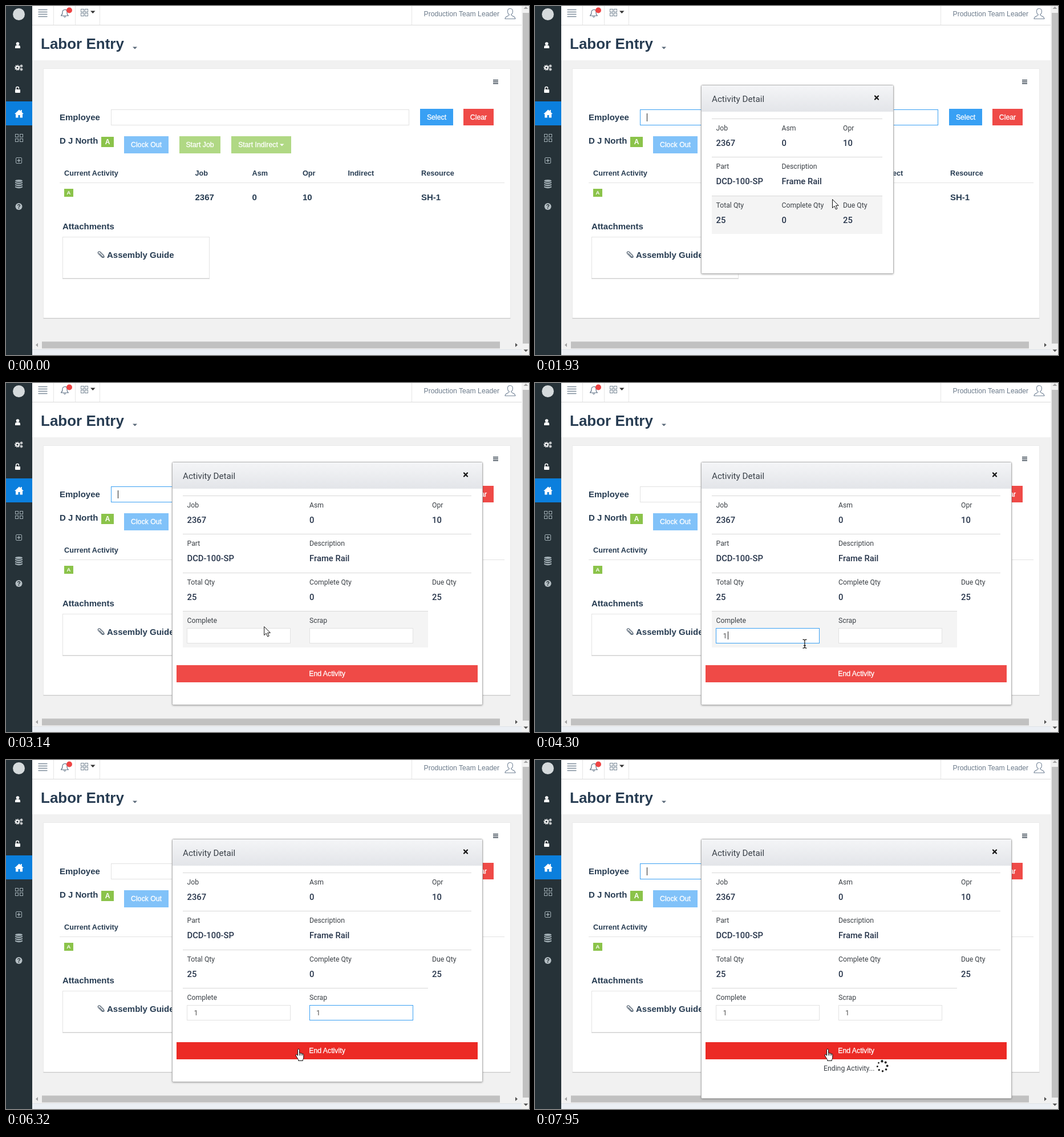
Write an HTML page that moves like this. It is 917x611 px and loops after 8000 ms.

```html
<!DOCTYPE html>
<html lang="en">
<head>
<meta charset="utf-8">
<title>Labor Entry</title>
<style>
  html, body { margin: 0; width: 100%; height: 100%; overflow: hidden; background: #fff; }
  svg { display: block; width: 917px; height: 611px; }
  text { font-family: "Liberation Sans", Arial, sans-serif; white-space: pre; }
  .b { font-weight: 700; fill: #273c52; }
  .btn { fill: #fff; stroke: #fff; stroke-width: .3px; font-size: 12.3px; text-anchor: middle; }
  .lab { font: 400 12.25px Roboto, sans-serif; fill: #3b4046; }
  .val { font: 500 14.8px Roboto, sans-serif; fill: #26344a; }
  .head { font: 400 15.2px Roboto, sans-serif; fill: #3a4149; }
  .num { font: 400 12.6px Roboto, sans-serif; fill: #555; }
  .line { fill: none; stroke-linecap: round; stroke-linejoin: round; }
</style>
</head>
<body>
<svg id="stage" viewBox="0 0 917 611" xmlns="http://www.w3.org/2000/svg"></svg>
<script>
const LOOP = 8000;
const BLUE = '#3aa0f3', RED = '#ef4a47', NAVY = '#273c52';

// Drawing helpers
const box = (x, y, w, h, fill, more = '') =>
  `<rect x="${x}" y="${y}" width="${w}" height="${h}" fill="${fill}" ${more}/>`;
const frame = (x, y, w, h, stroke, more = '') =>
  `<rect x="${x + .5}" y="${y + .5}" width="${w - 1}" height="${h - 1}" fill="none" stroke="${stroke}" ${more}/>`;
const path = (d, fill, more = '') => `<path d="${d}" fill="${fill}" ${more}/>`;
const dot = (x, y, r, fill, more = '') => `<circle cx="${x}" cy="${y}" r="${r}" fill="${fill}" ${more}/>`;
const ink = (d, color, w = 1) => `<path class="line" d="${d}" stroke="${color}" stroke-width="${w}"/>`;
const text = (cls, x, y, s, size) =>
  `<text class="${cls}" x="${x}" y="${y}"${size ? ` style="font-size:${size}px"` : ''}>${s}</text>`;
const bold = (x, y, s, size = 15) => text('b', x, y, s, size);
const button = (x, y, w, h, fill, s, tx = x + w / 2) =>
  box(x, y, w, h, fill) + text('btn', tx, y + h / 2 + 4.2, s);
const group = (id, inner) => `<g id="${id}">${inner}</g>`;
const field = (x, y, w, h, cls) =>
  box(x, y, w, h, '#fff') + frame(x, y, w, h, '#e2e2e2') + frame(x, y, w, h, BLUE, `class="${cls}" opacity="0"`);
const caret = (x, y, cls) => box(x, y, 1, 14, '#222', `class="${cls}" visibility="hidden"`);
const badge = (x, y, w, h, size) => box(x, y, w, h, '#8bc34a') +
  `<text x="${x + w / 2}" y="${y + h / 2 + size * .36}" font-size="${size}" font-weight="700" fill="#fff" text-anchor="middle">A</text>`;
const grid4 = (x, y, s, gap, color) => [0, 1, 2, 3].map(i =>
  frame(x + (i % 2) * (s + gap), y + (i >> 1) * (s + gap), s, s, color)).join('');
const cog = (x, y, r, w) => `<circle cx="${x}" cy="${y}" r="${r}" fill="none" stroke="#fff" stroke-width="${w}"/>` +
  `<circle cx="${x}" cy="${y}" r="${r + w * .8}" fill="none" stroke="#fff" stroke-width="${w * .8}" pathLength="16" stroke-dasharray="1 1"/>`;

function sidebar() {
  const dim = '#a3b0b6';
  return box(0, 0, 46, 611, '#263238') + box(0, 167, 46, 42, '#0b7fdd') +
    dot(22.5, 14.5, 10.5, '#d5dadc') +
    dot(20.5, 66, 2.8, '#fff') + path('M16 74v-2q0-3.2 3-3.2h3q3 0 3 3.2v2z', '#fff') +
    cog(20, 108, 2.6, 2) + cog(27, 105, 1.2, 1.2) + cog(27, 111, 1.2, 1.2) +
    box(16, 146, 9, 6, '#fff', 'rx="1"') + ink('M17.6 146v-2.2a2.4 2.4 0 0 1 4.8 0v.6', '#fff', 1.5) +
    path('M15 189l8-7.6 2.8 2.6v-2h2v4l3.2 3h-2v6.500h-4.500v-4.500h-3v4.500h-4.500v-6.500z', '#fff') +
    grid4(16, 224, 6, 2, dim) +
    frame(17, 265, 11, 11, dim, 'rx="1.500"') + ink('M22.500 268v5M20 270.500h5', dim, 1.300) +
    [0, 1, 2].map(i => path(`M16 ${308 + i * 3.8}q6.500 2.500 13 0v2q-6.500 3.500 -13 0z`, dim)).join('') +
    `<ellipse cx="22.5" cy="306" rx="6.500" ry="2" fill="${dim}"/>` +
    dot(22.5, 351, 6, '#b4bec3') +
    '<text x="22.5" y="354.600" font-size="10" font-weight="700" fill="#263238" text-anchor="middle">?</text>';
}

function topBar() {
  const grey = '#7d8c9a', rule = '#e6e6e6';
  return [83, 121, 164].map(x => box(x, 0, 1, 33, rule)).join('') +
    [6, 10, 14, 18].map(y => ink(`M57 ${y + .5}h15`, grey, 1.3)).join('') +
    ink('M96.500 17q2.500-2 2.500-6t4-4.500 4 4.500 2.500 6zM101.500 18.500q1.500 2 3 0', '#64768a', 1.2) +
    dot(111, 7.5, 5, '#ee4444') +
    grid4(131, 5, 6, 1, grey) + path('M148 8.500h8.500l-4.250 4.500z', '#333') +
    bold(61, 75, 'Labor Entry', 26) + path('M222 71.500h8l-4 4z', '#5a6a7a');
}

// The page with (tall) or without the attachments block; d is the extra width.
function page(d, tall) {
  const W = 904 + d, thick = tall ? 585 : 576, end = W - 20;
  const cols = tall ? [331.5, 431.5, 520, 599.5, 728] : [336, 439, 530, 610, 741];
  const heads = ['Job', 'Asm', 'Opr', 'Indirect', 'Resource'], cells = ['2367', '0', '10', '', 'SH-1'];
  const bottom = tall ? 546 : 392;
  let s = box(46, 0, W - 46, 611, '#fff') + box(46, 33, W - 46, 1, '#dcdcdc') +
    box(46, 95, W - 46, tall ? 490 : 476, '#f1f1f1') +
    box(46, thick, W - 46, 17, '#f1f1f1') +
    box(tall ? 63 : 62, thick + 2.5, tall ? 803 : 820, 12, '#c1c1c1') +
    path(`M52 ${thick + 8.5}l4-3.500v7z`, '#a3a3a3') + path(`M${W - 7} ${thick + 8.5}l-4-3.500v7z`, '#505050') +
    box(46, thick + 16, W - 46, 1, '#dfe3e8') + box(46, thick + 17, W - 46, 40, '#ebeff4') +
    topBar() +
    box(711 + d, 0, 1, 33, '#e6e6e6') +
    `<text x="${732.5 + d}" y="18" font-size="12.2" fill="#6c7b8b">Production Team Leader</text>` +
    ink(`M${884 + d} 4.500c-3 0-4.500 2-4.500 4.800 0 3 1.500 5 3 5.700 0 3-7 2-7.500 7.500h18c-.5-5.500-7.500-4.500-7.500-7.500 1.500-.7 3-2.700 3-5.700 0-2.800-1.500-4.800-4.500-4.800z`, '#77879a', 1.1);
  s += box(65.5, 109.5, end - 65, bottom - 108, '#e3e3e3') + box(65.5, bottom, end - 65, 1.4, '#cfcfcf') +
    box(66, 110, end - 66, bottom - 110, '#fff') +
    [129, 132, 135].map(y => box(854 + d, y, 9, 1.5, '#34414e')).join('') +
    bold(94, 200, 'Employee') + field(184, 181, 523 + d, 28, 'emp') + caret(196, 188, 'empCaret') +
    button(726 + d, 180, 58, 29, '#38a0f4', 'Select') + button(802 + d, 180, 53, 29, RED, 'Clear') +
    bold(94, 241, 'D J North') + badge(167, 229, 22, 18, 12) +
    button(207, 228, 78, 30, '#81c2f9', 'Clock Out') + button(304, 228, 72, 30, '#b0d884', 'Start Job') +
    button(395, 228, 105, 30, '#b0d884', 'Start Indirect', 442) + path('M480 241.500h7.500l-3.750 3.800z', '#fff') +
    bold(102, 297, 'Current Activity', 12.7) + box(94, 309, 780 + d, 1, '#e2e2e2') + badge(102, 320, 16, 14, 9.5);
  cols.forEach((x, i) => s += bold(x, 297, heads[i], 12.7) + bold(x, 340, cells[i]));
  if (tall) {
    s += bold(99, 391, 'Attachments') + box(99, 476, 258, 2, '#d4d4d4') + box(99, 404, 258, 73, '#fff') +
      frame(99, 404, 258, 73, '#e4e4e4') + bold(177, 441, 'Assembly Guide') +
      ink('M164 433l5.500 6a1.500 1.500 0 0 0 2-2l-6.500-6.500a2 2 0 0 0-3 3l6.500 6.500a2.700 2.700 0 0 0 4-1', '#4a5a6a', 1.1) +
      box(904, 0, 13, 611, '#f1f1f1') + box(906, 12, 11, 579, '#c1c1c1') +
      path('M907.500 5l4-4 4 4z', '#a3a3a3') + path('M907.500 601.500h8l-4 4z', '#505050');
  }
  return s;
}

const cross = (x, y) => ink(`M${x - 3} ${y - 3}l6 6m0-6l-6 6`, '#111', 2.3);

// Activity dialog: w is its width, xs its three columns.
function dialog(w, xs, wide) {
  const rowW = wide ? 506 : 299, id = wide ? 'wide' : 'narrow';
  const rows = [[['Job', '2367'], ['Asm', '0'], ['Opr', '10']],
    [['Part', 'DCD-100-SP'], ['Description', 'Frame Rail']],
    [['Total Qty', '25'], ['Complete Qty', '0'], ['Due Qty', '25']]];
  let s = `<rect id="${id}Box" x="291.5" y="138.5" width="${w}" height="${wide ? 425 : 330}" rx="2" fill="#fff" stroke="#b4b4b4" filter="url(#shade)"/>` +
    box(292, 139, w - 1, 46, 'url(#bar)') + text('head', 310, 167.5, 'Activity Detail') + cross(292 + w - 30, 160.5) +
    box(310, 332, rowW, 67, '#f4f4f4', `id="${id}Qty"`);
  rows.forEach((row, r) => {
    const y = 197 + r * 67.3;
    s += box(310, Math.round(y), rowW, 1, '#d8d8d8');
    row.forEach(([k, v], i) => s += text('lab', xs[i], y + 21, k) + text('val', xs[i], y + 48, v));
  });
  if (wide) {
    s += box(310, 400, 430, 63, '#f4f4f4', 'id="doneRow"') + box(310, 399, 430, 1, '#d8d8d8') +
      text('lab', 317.5, 420, 'Complete') + text('lab', 532, 420, 'Scrap') +
      field(317, 429, 182, 27, 'done') + field(532, 429, 182, 27, 'scrap') +
      group('doneOne', text('num', 329.5, 447, '1')) + group('scrapOne', text('num', 544, 447, '1')) +
      caret(330, 435, 'doneCaret') + caret(338, 435, 'doneCaret2') +
      caret(544, 435, 'scrapCaret') + caret(552, 435, 'scrapCaret2') +
      box(299, 494, 528, 30, RED) + box(299, 494, 528, 30, '#ec2a25', 'id="hot"') +
      text('btn', 563, 513, 'End Activity') +
      group('ending', text('lab', 506, 544, 'Ending Activity...') + group('spin',
        [...Array(8).keys()].map(i => {
          const a = i * Math.PI / 4;
          return dot((8.7 * Math.cos(a)).toFixed(2), (8.7 * Math.sin(a)).toFixed(2), 2.2 - i * .11, '#222');
        }).join('')));
  }
  return s;
}

const cursors =
  group('arrow', path('M.5.500v15l3.500-3.300 2.500 5.700 2.500-1.100-2.500-5.500h4.700z', '#fff', 'stroke="#111" stroke-linejoin="round"')) +
  group('beam', ink('M-3-7.500q2 0 3 1 1-1 3-1M0-6.500v13M-3 7.500q2 0 3-1 1 1 3 1M-1.500 3h3', '#111', 1.2)) +
  group('hand', path('M-1.500 1.500q0-1.500 1.500-1.500t1.500 1.500v5.500q1.500-.8 2.500.6 1.500-.8 2.500.7 2-.4 2.300 1.700v5q0 2-1.300 3.500v2h-8v-2l-4-6.500q-1.300-2.300.7-2.500 1 0 2.300 2z', '#fff', 'stroke="#111" stroke-linejoin="round"') +
    ink('M1.500 7v4M4 8v3M6.500 8.500v2.500', '#111'));

const stage = document.getElementById('stage');
stage.innerHTML = `<defs>
  <linearGradient id="bar" x2="0" y2="1"><stop stop-color="#f4f5f7"/><stop offset="1" stop-color="#e3e5e9"/></linearGradient>
  <filter id="shade" x="-5%" y="-5%" width="110%" height="110%"><feDropShadow dx="0" dy="1" stdDeviation="1.800" flood-color="#000" flood-opacity=".28"/></filter>
  </defs>` +
  group('tall', page(0, true)) + group('short', page(16, false)) + sidebar() +
  group('narrow', dialog(337, [317.5, 432.5, 540], false)) +
  group('wide', dialog(544, [317.5, 532, 747], true)) + cursors;

const el = id => document.getElementById(id);
const all = cls => stage.querySelectorAll('.' + cls);
const show = (id, on) => el(id).setAttribute('display', on ? 'inline' : 'none');
const blink = (cls, on) => all(cls).forEach(n => n.setAttribute('visibility', on ? 'inherit' : 'hidden'));
const glow = (cls, v) => all(cls).forEach(n => n.setAttribute('opacity', v));
const ramp = (t, a, b) => Math.min(1, Math.max(0, (t - a) / (b - a)));
const within = (t, ...spans) => spans.some(([a, b]) => t >= a && t < b);

// Pointer legs: start, end, from, to, sideways dip
const legs = [
  [360, 800, [792, 600], [521, 338], 0],
  [2910, 3290, [521, 338], [435, 448], 0],
  [4180, 4860, [435, 448], [568, 432], 17],
  [5800, 6320, [568, 432], [513, 506], 0]
];

function pointer(t) {
  const [a, b, from, to, dip] = legs.filter(l => t >= l[0]).pop() || legs[0];
  const p = 1 - (1 - ramp(t, a, b)) ** 1.73;
  return [from[0] + (to[0] - from[0]) * p, from[1] + (to[1] - from[1]) * p + dip * Math.sin(Math.PI * p)];
}

function render(t) {
  const short = within(t, [1200, 1930], [2450, 2910], [6540, 7260]);
  show('short', short);
  show('tall', !short);

  show('narrow', within(t, [1200, 2450]));
  el('narrow').setAttribute('opacity', .15 + .85 * (.5 - .5 * Math.cos(Math.PI * ramp(t, 1200, 1600))));
  show('wide', t >= 2450);
  el('wideBox').setAttribute('height', t < 6470 ? 425 : 454);

  const [x, y] = pointer(t);
  const inField = t >= 2910 && y >= 429 && y < 457 && (x > 317 && x < 499 || x > 532 && x < 714);
  const shape = inField ? 'beam' : t >= 5800 && y >= 494 ? 'hand' : 'arrow';
  for (const id of ['arrow', 'beam', 'hand']) {
    show(id, t >= 360 && id === shape);
    el(id).setAttribute('transform', `translate(${x.toFixed(1)} ${y.toFixed(1)})`);
  }
  show('wideQty', y >= 332 && y < 400);
  show('doneRow', y >= 400 && y < 463);
  el('hot').setAttribute('opacity', ramp(t, 6145, 6320));

  glow('emp', t < 6000 ? ramp(t, 1220, 1520) - ramp(t, 3540, 3840) : ramp(t, 6540, 6800));
  glow('done', ramp(t, 3540, 3840) - ramp(t, 4930, 5230));
  glow('scrap', ramp(t, 4930, 5230) - ramp(t, 6500, 6760));

  blink('empCaret', within(t, [1200, 3460], [6540, 7070], [7600, LOOP]));
  blink('doneCaret', within(t, [3460, 3990]));
  blink('doneCaret2', within(t, [4150, 4680]));
  blink('scrapCaret', within(t, [4860, 5410]));
  blink('scrapCaret2', within(t, [5780, 6310]));
  show('doneOne', t >= 4150);
  show('scrapOne', t >= 5780);

  show('ending', t >= 6470);
  el('spin').setAttribute('transform', `translate(609 536) rotate(${((t - 6470) * .18).toFixed(1)})`);
}

let start;
function tick(now) {
  start ??= now;
  render((now - start) % LOOP);
  requestAnimationFrame(tick);
}
render(0);
requestAnimationFrame(tick);
</script>
</body>
</html>
```
